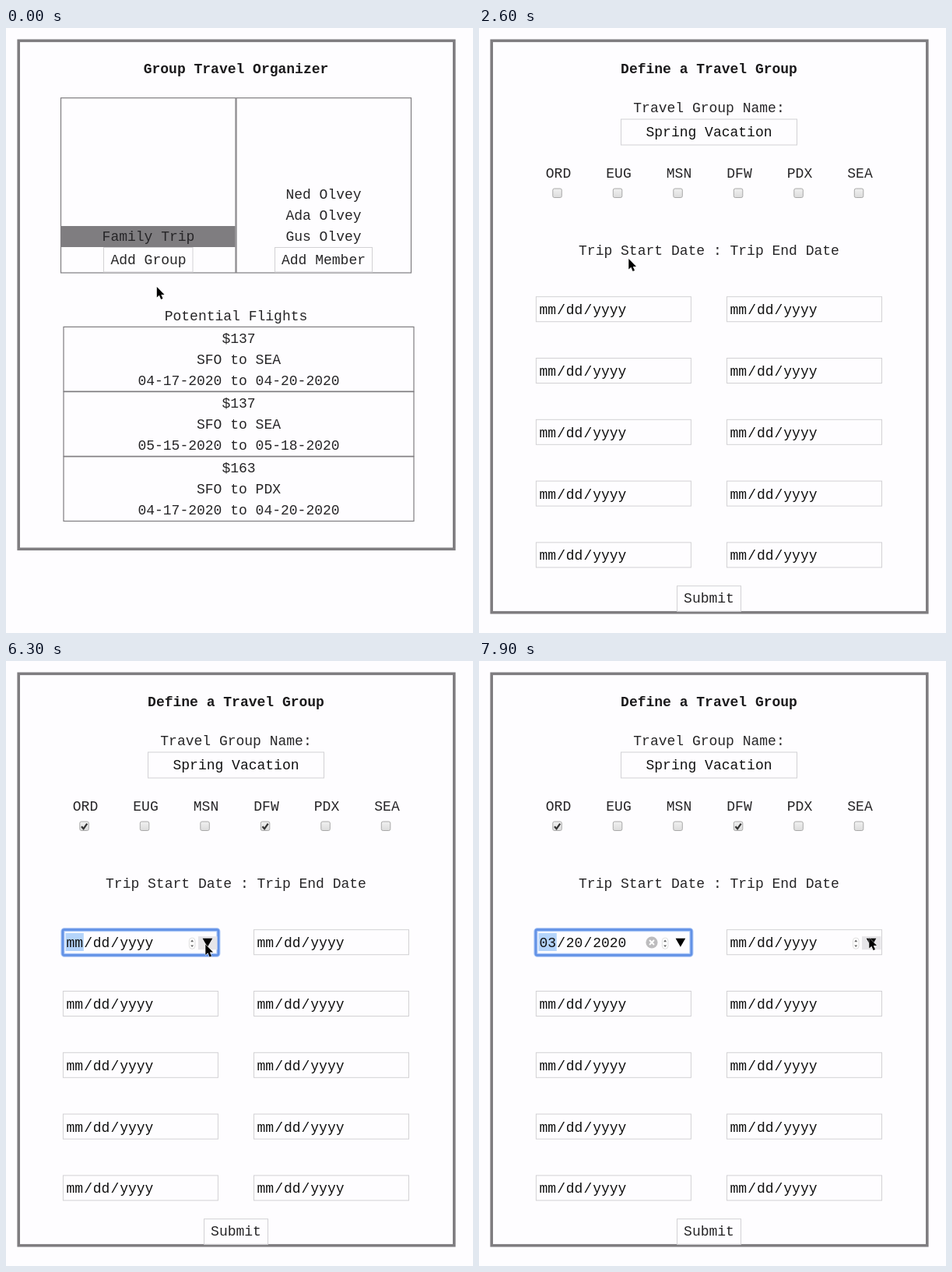
Recreate the animation shown at these times as an HTML page. Size 600 px wide and 776 px high, loop 8 s.

```html
<!DOCTYPE html>
<html lang="en">
<head>
<meta charset="utf-8">
<title>Group Travel Organizer</title>
<style>
  html, body { margin: 0; width: 100%; height: 100%; overflow: hidden; background: #fefdff; }
  svg { display: block; width: 100%; height: 100%; }
  text { font: 18px "Courier New", "Liberation Mono", monospace; fill: #262527; white-space: pre; }
  .mid { text-anchor: middle; }
  .bold { font-weight: bold; fill: #1b1a1c; }
  .ink { fill: #111; }
  .frame { fill: none; stroke: #7f7d80; stroke-width: 3.6; }
  .panel { fill: none; stroke: #7f7d80; stroke-width: 1.2; }
  .control { fill: #fefdff; stroke: #d2d1d4; }
  .cal text { font: 13px "Liberation Sans", Arial, sans-serif; fill: #111; }
  .cal .other { fill: #b4b4b4; }
</style>
</head>
<body>
<svg viewBox="0 0 600 776">
  <defs>
    <linearGradient id="key" x2="0" y2="1">
      <stop stop-color="#f1f1f1"/><stop offset="1" stop-color="#dcdcdc"/>
    </linearGradient>
  </defs>
  <g id="home"></g>
  <g id="form"></g>
  <g id="cursor">
    <path d="M.3 0V13.6L3.4 10.8 5.6 16 8 15 5.8 9.9H10Z" fill="#000" stroke="#fff" stroke-width="1" paint-order="stroke"/>
  </g>
</svg>
<script>
const LOOP = 8000, STEP = 100;
const OPEN_FORM = 2600, CHECK_FIRST = 4500, CHECK_SECOND = 5600;
const FOCUS = 6300, OPEN_CAL = 6400, CLOSE_CAL = 7400, PICKED = 7600;

// time, x, y of the pointer tip
const pointer = [
  [0, 193.5, 332], [100, 188, 332], [200, 184, 332], [1600, 184, 332],
  [1700, 184, 329.5], [1800, 184, 330.5], [2100, 184, 330.5], [2500, 192, 296],
  [3500, 192, 296], [3600, 188, 291], [4000, 130, 243], [4200, 106, 212],
  [4400, 100.5, 204], [4600, 100.5, 204], [4700, 112, 205], [4900, 255, 206],
  [5100, 414, 207], [5200, 350, 208], [5500, 336, 213], [5700, 336, 213],
  [5800, 333, 222], [6000, 290, 310], [6200, 258, 361], [6300, 256, 363.5],
  [6600, 256, 363.5], [6700, 258, 375], [6900, 275, 450], [7100, 293, 505],
  [7200, 293, 507], [7300, 305, 498], [7500, 499, 367], [7600, 501, 363], [7900, 501, 355]
];

const $ = id => document.getElementById(id);
const range = n => [...Array(n).keys()];
const rect = (cls, x, y, w, h, extra = '') =>
  `<rect class="${cls}" x="${x}" y="${y}" width="${w}" height="${h}" ${extra}/>`;
const text = (s, x, middle, cls = 'mid') => `<text class="${cls}" x="${x}" y="${middle + 6}">${s}</text>`;
const button = (s, x, y, w, h, tx) => rect('control', x, y, w, h) + text(s, tx, y + 15, 'mid');
const group = (id, body) => `<g id="${id}">${body}</g>`;

function buildHome() {
  const members = ['Ned Olvey', 'Ada Olvey', 'Gus Olvey'];
  const flights = [
    ['$137', 'SFO to SEA', '04-17-2020 to 04-20-2020'],
    ['$137', 'SFO to SEA', '05-15-2020 to 05-18-2020'],
    ['$163', 'SFO to PDX', '04-17-2020 to 04-20-2020']
  ];
  return rect('frame', 16.2, 16.3, 559.6, 652) +
    text('Group Travel Organizer', 295.5, 52, 'mid bold') +
    rect('panel', 70.5, 89.7, 224.5, 224.3) + rect('panel', 296, 89.7, 224.5, 224.3) +
    rect('', 71, 254, 223.5, 27, 'fill="#7f7d80"') +
    text('Family Trip', 183, 267) +
    members.map((m, i) => text(m, 408, 213 + i * 27)).join('') +
    button('Add Group', 125.5, 281.5, 114.5, 31.5, 183) +
    button('Add Member', 345.5, 281.5, 125, 31.5, 408) +
    text('Potential Flights', 295.5, 369) +
    flights.map((lines, i) => {
      const y = 383.4 + i * 83.2;
      return rect('panel', 74, y, 450, 82.7) +
        lines.map((s, j) => text(s, 299, y + 14.5 + j * 27)).join('');
    }).join('');
}

const dateText = (x, y, parts) => {
  const [m, d, year] = parts;
  return [[m, 4], ['/', 26.8], [d, 38.4], ['/', 61], [year, 72.8]]
    .map(([s, dx]) => text(s, x + dx, y + 16.5, 'ink')).join('');
};
const spinner = (x, y) =>
  rect('', x + 162, y + 10.5, 7.5, 14, 'rx="3.5" fill="#fff" stroke="#d6d6d6" stroke-width=".8"') +
  `<path d="M${x + 163.7} ${y + 15.5}l2-2.6 2 2.6zm0 4.2l2 2.6 2-2.6z" fill="#666"/>`;
const dropArrow = (x, y) => `<path d="M${x + 179.2} ${y + 11}h12.6l-6.3 11z" fill="#000"/>`;
const hoverPatch = (x, y) => rect('', x + 173.5, y + 8.5, 24.5, 17, 'fill="#e6e5e8"');

function buildCalendar() {
  const colX = i => 105.5 + i * 38.25, rowY = i => 469 + i * 22.5;
  const label = (s, x, y, cls = 'mid') => `<text class="${cls}" x="${x}" y="${y + 4.7}">${s}</text>`;
  const icons = ['M276 404l5-4v8z', 'M306.8 403a4 4 0 1 0 8 0a4 4 0 1 0-8 0', 'M345 404l-5-4v8z'];
  return rect('', 73.5, 378.5, 294.5, 205, 'rx="2.5" fill="#fff" stroke="#bebec2"') +
    `<text x="91" y="409" style="font-size:13.4px">March 2020</text>` +
    '<path d="M169 402.3h7.4l-3.7 4.6z" fill="#111"/>' +
    icons.map((d, i) =>
      rect('', 265.7 + i * 31.4, 390.5, 27, 26.5, 'rx="2" fill="url(#key)" stroke="#bdbdbd"') +
      `<path d="${d}" fill="#5c5c5c"/>`).join('') +
    rect('', 86, 429, 269.5, 29, 'fill="#f1f1f2"') +
    '<path d="M86 458h269.5" stroke="#c4c4c4"/>' +
    rect('', 240, 458.3, 37.7, 21.9, 'fill="none" stroke="#bcbcbc"') +
    rect('', 0, 0, 38, 22, 'id="dayHover" fill="#bccae6"') +
    ['Sun', 'Mon', 'Tue', 'Wed', 'Thu', 'Fri', 'Sat'].map((d, i) => label(d, colX(i), 444)).join('') +
    range(35).map(i => label(i % 31 + 1, colX(i % 7), rowY(Math.floor(i / 7)), i < 31 ? 'mid' : 'mid other')).join('') +
    rect('', 85.8, 428.7, 269.8, 142.3, 'fill="none" stroke="#7fabed"');
}

function buildForm() {
  const fieldY = i => 344.7 + i * 78.8;
  const blank = ['mm', 'dd', 'yyyy'], left = 73.4, right = 318.5, top = fieldY(0);
  const field = (x, y) => rect('control', x, y, 199, 32);
  const airports = ['ORD', 'EUG', 'MSN', 'DFW', 'PDX', 'SEA'];
  const tick = i => `<path d="M${97 + i * 77.5} 212.2l2.6 3 4.6-6.6" fill="none" stroke="#333" stroke-width="2.2"/>`;
  return rect('frame', 16.2, 16.3, 559.6, 733.4) +
    text('Define a Travel Group', 295.5, 52, 'mid bold') +
    text('Travel Group Name:', 295.5, 102) +
    rect('control', 182.5, 117, 226, 33) +
    text('Spring Vacation', 295.5, 133, 'mid ink') +
    airports.map((a, i) => text(a, 102 + i * 77.5, 186) +
      rect('', 94.8 + i * 77.5, 206, 11.5, 11.5, 'rx="2" fill="url(#key)" stroke="#a9a9a9"')).join('') +
    group('tickFirst', tick(0)) + group('tickSecond', tick(3)) +
    text('Trip Start Date : Trip End Date', 295.5, 285) +
    range(5).map(i => field(left, fieldY(i)) + field(right, fieldY(i)) +
      (i ? dateText(left, fieldY(i), blank) : '') + dateText(right, fieldY(i), blank)).join('') +
    group('focusRing',
      rect('', 72.9, 344.7, 200, 32.6, 'rx="2" fill="none" stroke="#a9c5f6" stroke-width="5"') +
      rect('', 72.9, 344.7, 200, 32.6, 'rx="2" fill="none" stroke="#6392e6" stroke-width="2.8"') +
      rect('', 76.5, 349, 23.3, 23, 'fill="#b4d4fb"')) +
    group('dateBlank', dateText(left, top, blank)) +
    group('datePicked', dateText(left, top, ['03', '20', '2020']) +
      '<circle cx="222" cy="361" r="7.6" fill="#bdbcbe"/>' +
      '<path d="M219 358l6 6m0-6l-6 6" stroke="#fff" stroke-width="1.9"/>') +
    group('leftHover', hoverPatch(left, top)) +
    group('leftTools', spinner(left, top) + dropArrow(left, top)) +
    group('rightHover', hoverPatch(right, top)) +
    group('rightTools', spinner(right, top) + dropArrow(right, top)) +
    button('Submit', 254.5, 715.7, 82, 32.5, 295.5) +
    `<g id="calendar" class="cal">${buildCalendar()}</g>`;
}

$('home').innerHTML = buildHome();
$('form').innerHTML = buildForm();

const show = (id, on) => { $(id).style.display = on ? '' : 'none'; };
const inside = (x, y, l, t, r, b) => x >= l && x < r && y >= t && y < b;

function pointerAt(t) {
  const i = pointer.findIndex(k => k[0] > t);
  if (i < 0) return pointer[pointer.length - 1].slice(1);
  const [t0, x0, y0] = pointer[i - 1], [t1, x1, y1] = pointer[i];
  const p = (t - t0) / (t1 - t0);
  return [x0 + (x1 - x0) * p, y0 + (y1 - y0) * p];
}

function render(t) {
  const [x, y] = pointerAt(t);
  $('cursor').setAttribute('transform', `translate(${x} ${y})`);
  show('home', t < OPEN_FORM);
  show('form', t >= OPEN_FORM);
  show('tickFirst', t >= CHECK_FIRST);
  show('tickSecond', t >= CHECK_SECOND);

  // The open calendar blocks hover on the page below.
  const live = t < OPEN_CAL || t >= PICKED;
  const overField = l => live && inside(x, y, l, 345, l + 199, 377);
  const overArrow = l => live && inside(x, y, l + 173, 345, l + 199, 377);
  show('focusRing', t >= FOCUS);
  show('dateBlank', t < PICKED);
  show('datePicked', t >= PICKED);
  show('leftTools', t >= FOCUS || overField(73));
  show('leftHover', overArrow(73));
  show('rightTools', overField(318));
  show('rightHover', overArrow(318));

  show('calendar', t >= OPEN_CAL && t < CLOSE_CAL);
  const overDay = inside(x, y, 86.4, 458, 354, 570.5);
  show('dayHover', overDay);
  if (overDay) {
    $('dayHover').setAttribute('x', 86.7 + Math.floor((x - 86.4) / 38.25) * 38.25);
    $('dayHover').setAttribute('y', 458.2 + Math.floor((y - 458) / 22.5) * 22.5);
  }
}

const start = performance.now();
function tick() {
  const t = (performance.now() - start) % LOOP;
  render(Math.floor(t / STEP) * STEP);
  requestAnimationFrame(tick);
}
tick();
</script>
</body>
</html>
```
